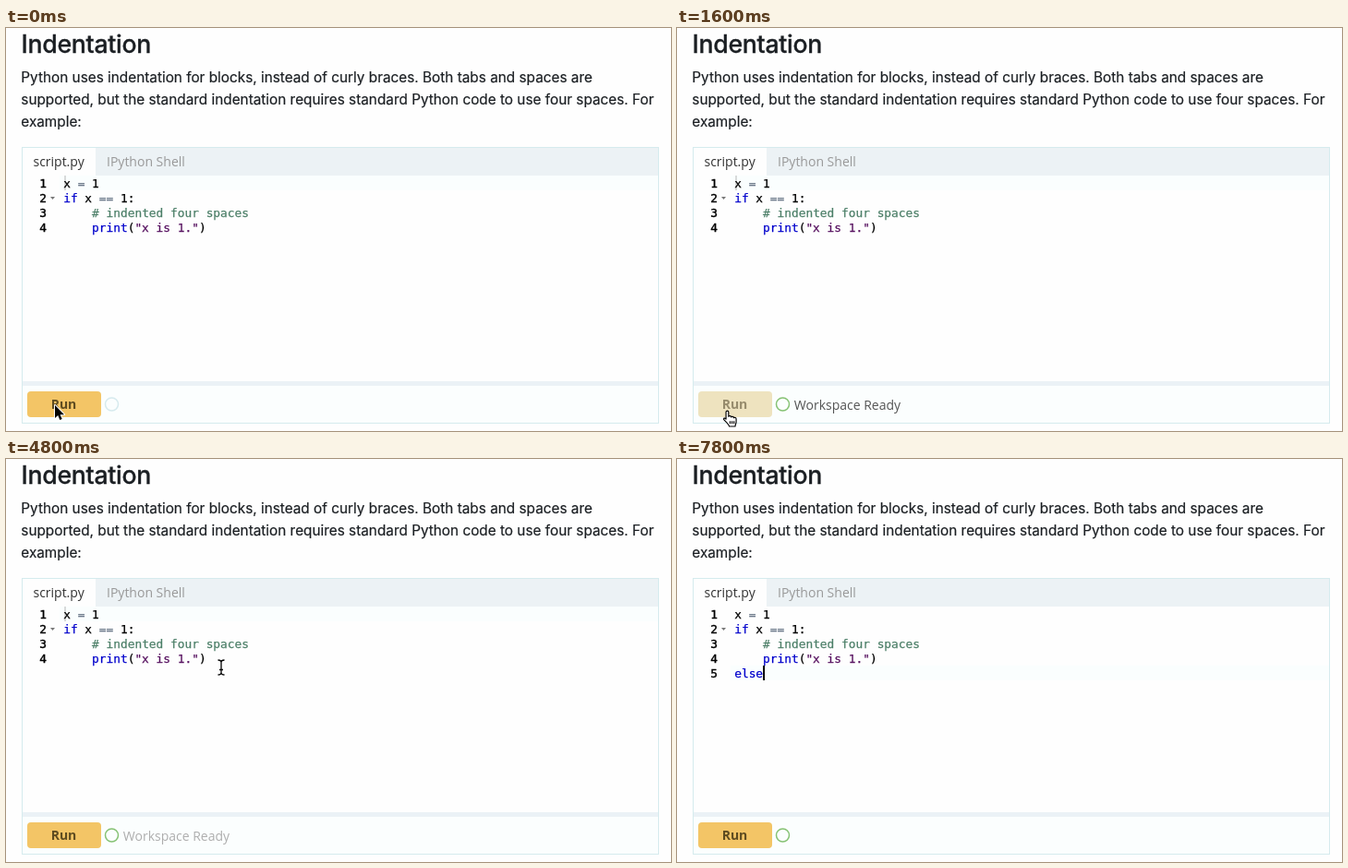
Animation of 720 by 437 pixels, one loop 8000 ms. Source, as an HTML page with a canvas:

```html
<!DOCTYPE html>
<html lang="en">
<head>
<meta charset="utf-8">
<title>Indentation</title>
<style>
  html, body { margin: 0; width: 100%; height: 100%; overflow: hidden; background: #fefefe; }
  canvas { display: block; }
</style>
</head>
<body>
<canvas id="stage" width="720" height="437"></canvas>
<script>
const ctx = document.getElementById('stage').getContext('2d');
const LOOP = 8000, STEP = 200;
const CHAR = 7.72, LINE = 16, CODE_X = 62.2, CODE_TOP = 160;
const UI = '"Open Sans", "Noto Sans", sans-serif';
const BODY = 'Inter, sans-serif';
const MONO = '12.83px "DejaVu Sans Mono", monospace';
const INK = { plain: '#000', keyword: '#0000cc', operator: '#687687', comment: '#4c7f68', string: '#56105f' };

// Each token: line, column, text, kind
const CODE = [
  [0, 0, 'x', 'plain'], [0, 2, '=', 'operator'], [0, 4, '1', 'plain'],
  [1, 0, 'if', 'keyword'], [1, 3, 'x', 'plain'], [1, 5, '==', 'operator'], [1, 8, '1:', 'plain'],
  [2, 4, '# indented four spaces', 'comment'],
  [3, 4, 'print', 'keyword'], [3, 9, '(', 'plain'], [3, 10, '"x is 1."', 'string'], [3, 19, ')', 'plain']
];

// Mouse path: time, x, y
const MOUSE = [
  [0, 53, 409], [200, 53, 409], [1000, 54.5, 415], [1200, 53.5, 417], [1400, 53, 416], [1600, 52, 415],
  [2400, 52, 415], [2800, 54.5, 398], [3600, 54.5, 398], [4200, 55, 145], [4400, 55, 145],
  [4800, 233, 226], [5400, 233, 226]
];

const ARROW = new Path2D('M0 0V14L3.2 11L5.3 16L7.7 15L5.6 10.2H10Z');
const HAND = new Path2D('M1 1.5C1 -.3 3.6 -.3 3.6 1.5V6C4 5 6.2 5 6.3 6.5C7 5.6 8.7 5.9 8.9 7.2' +
  'C10 6.6 11.4 7 11.4 8.5V11.5C11.4 13 10.5 14 10.4 16H4.3C4 14 1.5 12 -1.2 9C-1.8 7.6 -.3 7 1 8.5Z' +
  'M5.2 10.5V13.5M7.2 10.5V13.5M9.2 10.5V13.5');
const BEAM = new Path2D('M-3.5 -8Q0 -8 0 -5.5Q0 -8 3.5 -8M0 -6V6M-3.5 8Q0 8 0 5.5Q0 8 3.5 8M-2 2.5H2');

function rect(x, y, w, h, color, radius = 0) {
  ctx.fillStyle = color;
  ctx.beginPath();
  ctx.roundRect(x, y, w, h, radius);
  ctx.fill();
}

// A thin outline thickens the glyphs when `bolder` is set
function text(str, x, y, font, color, { align = 'left', bolder = 0 } = {}) {
  ctx.font = font;
  ctx.fillStyle = ctx.strokeStyle = color;
  ctx.textAlign = align;
  ctx.fillText(str, x, y);
  if (bolder) {
    ctx.lineWidth = bolder;
    ctx.strokeText(str, x, y);
  }
}

function code(str, col, row, color) {
  text(str, CODE_X + col * CHAR, 173 + row * LINE, MONO, color, { bolder: 0.25 });
}

function ring(color, from = 0, sweep = 2 * Math.PI) {
  ctx.strokeStyle = color;
  ctx.lineWidth = 1.5;
  ctx.beginPath();
  ctx.arc(114.5, 408, 7, from, from + sweep);
  ctx.stroke();
}

function triangle(x, y, halfWidth, height, color) {
  ctx.fillStyle = color;
  ctx.beginPath();
  ctx.moveTo(x - halfWidth, y);
  ctx.lineTo(x + halfWidth, y);
  ctx.lineTo(x, y + height);
  ctx.fill();
}

function drawArticle() {
  ctx.letterSpacing = '-0.3px';
  text('Indentation', 16.5, 27, '500 26.7px ' + BODY, '#1b1f23', { bolder: 0.3 });
  ctx.letterSpacing = '0px';
  [
    'Python uses indentation for blocks, instead of curly braces. Both tabs and spaces are',
    'supported, but the standard indentation requires standard Python code to use four spaces. For',
    'example:'
  ].forEach((line, i) => text(line, 16.3, 59 + 24 * i, '15.33px ' + BODY, '#1b1f23', { bolder: 0.2 }));
}

function drawPanel(shell) {
  rect(17, 129, 690, 300, '#d5ebee');
  rect(18, 130, 688, 298, '#fefefe');
  rect(18, 130, 688, 30, '#ecf2f5');
  if (shell) rect(97, 130, 109, 30, '#fefefe');
  else rect(18, 130, 79, 30, '#fefefe');
  text('script.py', 29.5, 150, '14px ' + UI, shell ? '#999' : '#333');
  text('IPython Shell', 109, 150, '14px ' + UI, shell ? '#333' : '#999');
  rect(18, 383, 688, 5, '#ebf2f6');
  rect(18, 388, 688, 40, '#fbfefe');
}

function drawShell() {
  text('x is 1.', 21.5, 173, MONO, '#75592b');
  text('In [1]:', 21.5, 205, MONO, '#000', { bolder: 0.25 });
  rect(83.5, 192, 1, 16, '#aaa');
}

function drawEditor(t) {
  const focused = t >= 5000, newLine = t >= 5400;
  const row = newLine ? 4 : focused ? 3 : 0;
  const typed = 'else'.slice(0, Math.max(0, Math.floor((t - 6800) / STEP)));
  rect(58, CODE_TOP + row * LINE, 648, LINE, '#fafefe');
  if (!focused) rect(63.5, CODE_TOP, 1, LINE, '#b5b5b5');

  for (let i = 0; i < (newLine ? 5 : 4); i++) {
    text(String(i + 1), 44, 173 + i * LINE, MONO, '#000', { align: 'right', bolder: 0.4 });
  }
  triangle(50.5, 183, 2.5, 3, '#777');
  for (const [line, col, str, kind] of CODE) code(str, col, line, INK[kind]);
  code(typed, 0, 4, INK.keyword);

  if (focused) {
    const col = !newLine ? 20 : t < 6400 ? 4 : typed.length;
    rect(CODE_X + col * CHAR, CODE_TOP + row * LINE, 2, LINE, '#000');
  }
}

function drawFooter(t) {
  const busy = t >= 400 && t < 2200;
  const hover = t >= 2200 && t < 3800;
  rect(23, 394, 80, 28, busy ? '#eee3bf' : hover ? '#fae1ac' : '#f3c566', 4);
  text('Run', 62.5, 413, 'bold 14px ' + UI, busy ? '#968b6c' : '#5d4b20', { align: 'center' });

  if (t >= 1400) ring('#86c274');
  else {
    ring('#d6eaee');
    if (busy) ring('#f3f9fa', t / 150, 1.2);
  }
  if (t >= 1400 && t < 5200) {
    const gray = t < 2600 ? 85 : t < 3800 ? 152 : 174;
    text('Workspace Ready', 126.8, 414, '14px ' + UI, `rgb(${gray},${gray},${gray})`);
  }
  if (t >= 600 && t < 1400) {
    rect(17, 363, 91, 23, '#323232', 4);
    triangle(62, 386, 5, 5, '#323232');
    text('Execute Code', 62, 379, '12px ' + UI, '#fff', { align: 'center' });
  }
}

function drawMouse(t) {
  const next = MOUSE.findIndex(point => point[0] > t);
  if (next < 0) return;
  const [t0, x0, y0] = MOUSE[next - 1], [t1, x1, y1] = MOUSE[next];
  const k = (t - t0) / (t1 - t0);
  const x = x0 + (x1 - x0) * k, y = y0 + (y1 - y0) * k;
  ctx.save();
  ctx.translate(x, y);
  ctx.lineJoin = 'round';
  if (y > 160 && y < 383) {
    ctx.lineWidth = 3;
    ctx.strokeStyle = '#fff';
    ctx.stroke(BEAM);
    ctx.lineWidth = 1.3;
    ctx.strokeStyle = '#000';
    ctx.stroke(BEAM);
  } else if (t < 1400) {
    ctx.lineWidth = 2;
    ctx.strokeStyle = '#fff';
    ctx.stroke(ARROW);
    ctx.fillStyle = '#000';
    ctx.fill(ARROW);
  } else {
    ctx.scale(1.06, 1.06);
    ctx.lineWidth = 1.1;
    ctx.fillStyle = '#fff';
    ctx.fill(HAND);
    ctx.strokeStyle = '#000';
    ctx.stroke(HAND);
  }
  ctx.restore();
}

function draw(now) {
  const t = Math.floor((now % LOOP) / STEP) * STEP;
  const shell = t >= 2600 && t < 4400;
  rect(0, 0, 720, 437, '#fefefe');
  drawArticle();
  drawPanel(shell);
  if (shell) drawShell();
  else drawEditor(t);
  drawFooter(t);
  drawMouse(t);
}

const start = performance.now();
function tick() {
  draw(performance.now() - start);
  requestAnimationFrame(tick);
}
tick();
</script>
</body>
</html>
```
